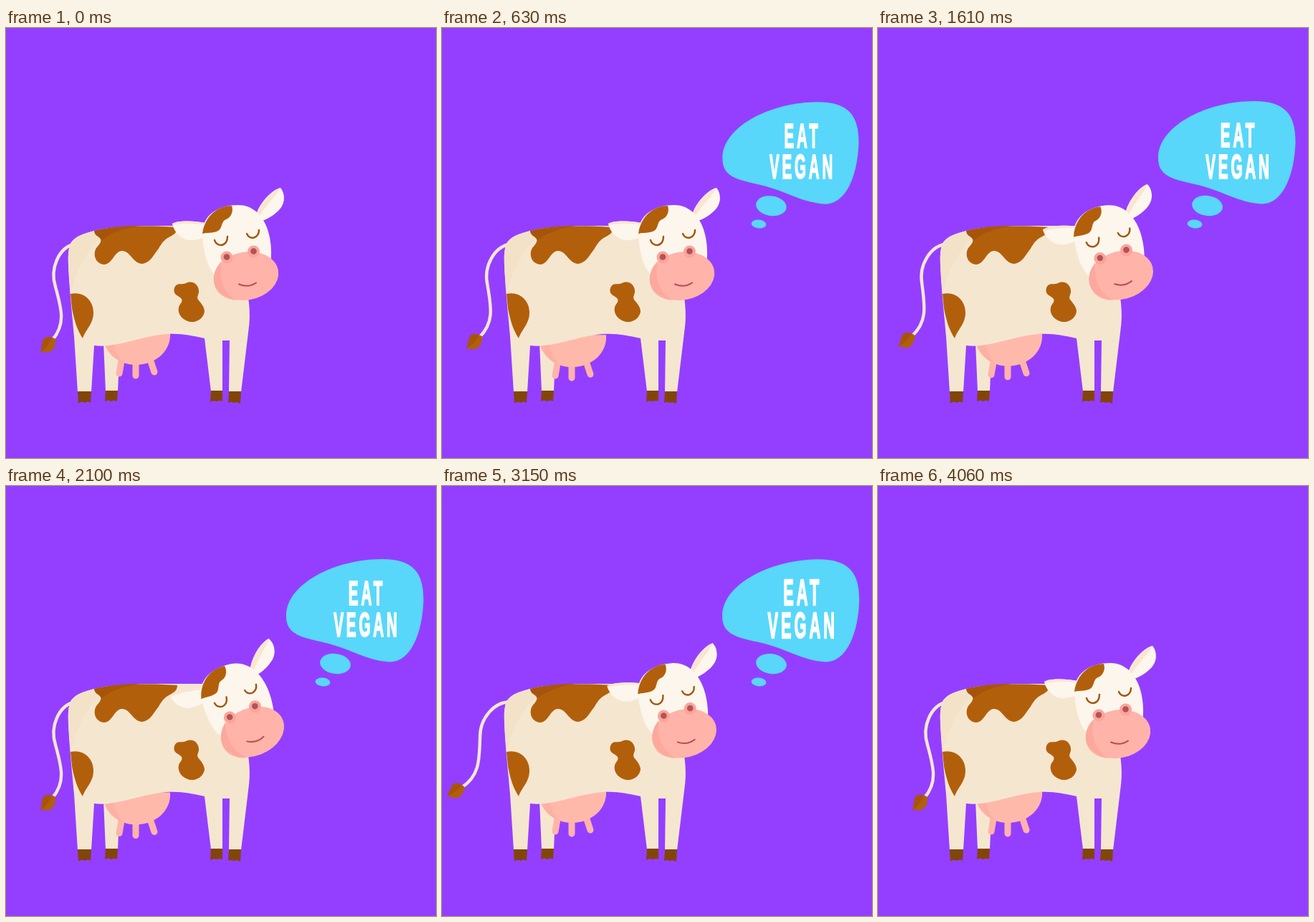
An HTML page that plays this animation: 600x600 px, repeating every 4.13 s.

```html
<!DOCTYPE html>
<html lang="en">
<head>
<meta charset="utf-8">
<title>Cow with a thought bubble</title>
<style>
  html, body { margin: 0; width: 100%; height: 100%; overflow: hidden; background: #943fff; }
  svg { display: block; width: 100%; height: 100%; }
  .skin { fill: #f5e6cf; }
  .rump { fill: #f3e1c8; }
  .pale { fill: #fcf6ec; }
  .shade { fill: #f8e5d2; }
  .brown { fill: #b25f0c; }
  .dark { fill: #a7540b; }
  .hoof { fill: #824509; }
  .pink { fill: #ffb3a9; }
  .udder { fill: #ffb9ab; }
  .rose { fill: #fda49a; }
  .dot { fill: #b0545a; }
  .cyan { fill: #58d7fb; }
  .line { fill: none; stroke-width: 2.4; stroke-linecap: round; }
  text {
    font: bold 48px "Liberation Sans", Arial, sans-serif;
    letter-spacing: 9px;
    text-anchor: middle;
    fill: #fff;
    stroke: #fff;
    stroke-width: 2.2;
    stroke-linejoin: round;
  }
</style>
</head>
<body>
<svg viewBox="0 0 600 600">
  <rect width="600" height="600" fill="#943fff"/>

  <g id="tail">
    <path class="line" stroke="#f5e6cf" style="stroke-width:4.4"
      d="M97 301C73 306 61 336 69 361C77 391 84 412 65 435"/>
    <path class="brown" d="M53 433C58 430 66 431 69 434C70 443 66 449 63 451C58 454 52 451 48 453C51 446 49 438 53 433Z"/>
    <path class="dark" d="M53 433C57 430 61 431 64 432C60 441 55 448 48 453C51 446 49 438 53 433Z"/>
  </g>

  <path class="skin" d="M136 438L139 507H156L159 438Z"/>
  <path class="hoof" d="M139 506H156L155 521Q151 518 147 521Q142 518 138 521Z"/>

  <g id="udder">
    <path class="line" stroke="#ffb3a9" style="stroke-width:9" d="M161 465L158 482M181 467V485M201 462L207 480"/>
    <path class="udder" d="M135 425H229C231 450 209 470 181 470C157 470 135 452 135 425Z"/>
    <path class="rose" opacity=".45" d="M135 425H150C149 444 154 457 164 467C147 461 135 447 135 425Z"/>
  </g>

  <path class="skin" d="M91 299C98 290 108 287 123 283C150 275 210 276 275 276L330 300L338 376C341 398 340 410 338 425L328 508H311L312 436H302V507H286L277 433C255 428 237 425 215 428C180 433 150 447 123 443L119 508H100L95 430C92 395 86 342 87 315Q88 304 91 299Z"/>
  <path class="rump" d="M91 299C98 290 108 287 123 283L133 293C112 309 98 338 90 371C88 345 86 325 87 315Q88 304 91 299Z"/>
  <g class="hoof">
    <path d="M100 507H119L118 523Q114 520 110 523Q105 520 101 524Z"/>
    <path d="M286 506H302V521Q298 519 294 521Q289 519 285 522Z"/>
    <path d="M311 507H328L327 524Q322 521 318 523Q314 521 310 523Z"/>
  </g>

  <g class="brown">
    <path d="M123 283C150 276 205 275 239 278C239 284 236 287 231 290C217 296 216 305 209 313C202 324 196 329 189 329C176 327 173 310 161 311C150 313 149 329 137 330C124 329 121 315 126 307C132 300 134 297 131 293C128 290 124 290 123 283Z"/>
    <path d="M90 371C108 367 122 380 122 397C122 413 111 421 107 433C100 423 95 408 92 391Z"/>
    <path d="M235 363C238 354 246 359 251 356C262 351 270 360 269 369C268 374 266 375 268 379C272 384 277 389 277 396C275 406 266 411 257 410C246 408 239 399 241 390C242 385 247 383 245 378C242 373 232 373 235 363Z"/>
  </g>
  <path class="dark" d="M123 283C145 277 170 276 187 276C165 279 147 286 133 296C131 290 124 290 123 283Z"/>

  <g id="head">
    <path class="pale" d="M278 272C262 269 240 268 232 273C234 284 245 298 262 296C270 295 276 293 280 290Z"/>
    <path class="shade" d="M278 272C262 269 240 268 232 273L233 275C246 272 262 273 278 274Z"/>
    <path class="pale" d="M348 265C350 250 368 227 383 223C390 231 390 246 380 255C372 263 362 268 354 270Z"/>
    <path class="shade" d="M348 265C350 250 368 227 383 223C379 233 360 249 351 267Z"/>
    <path class="pale" d="M274 290C272 263 294 247 324 247C352 247 371 275 370 318L368 345L300 352C280 340 276 312 274 290Z"/>
    <path class="brown" d="M274 287C277 263 295 248 315 248C318 257 313 265 307 267C300 269 302 280 296 283C288 287 280 285 274 287Z"/>
    <g class="line" stroke="#a0550c">
      <path d="M291 296Q293 303 301 303Q309 301 309 291"/>
      <path d="M336 287Q339 294 346 292.500Q353 290 353 282"/>
    </g>
    <ellipse class="pink" cx="335" cy="346" rx="45.500" ry="33.500" transform="rotate(-10 335 346)"/>
    <path class="rose" opacity=".75" d="M301 325C286 340 286 362 301 373Q309 379 322 380C302 370 296 346 301 325Z"/>
    <circle class="rose" cx="308" cy="320" r="8.500"/>
    <circle class="rose" cx="345.500" cy="312" r="8.500"/>
    <circle class="dot" cx="308" cy="319.500" r="4.300"/>
    <circle class="dot" cx="345.500" cy="311.500" r="4.300"/>
    <path class="line" stroke="#b9484f" style="stroke-width:2" d="M325 357.500Q338 363 349 355.500"/>
  </g>

  <g id="bubble">
    <path class="cyan" d="M391 180C392 136 460 102 525 102C570 102 583 123 582.500 160C581 205 565 246 535 245.500C500 243 480 226 440 217.500C410 211 390 206 391 180Z"/>
    <ellipse class="cyan" cx="459.500" cy="248" rx="21.500" ry="14" transform="rotate(8 459.5 248)"/>
    <ellipse class="cyan" cx="442" cy="273.500" rx="10.500" ry="6" transform="rotate(5 442 273.5)"/>
    <g id="words">
      <g transform="translate(503.500 0) scale(.43 1)">
        <text y="166">EAT</text>
        <text y="210">VEGAN</text>
      </g>
    </g>
  </g>

  <path id="petal" fill="#d9b8f7" d="M-4 4C-5 -2 1 -6 5 -2L2 -1L1 2L-1 0Z"/>
</svg>

<script>
const LOOP = 4130, STEP = 70;
const part = id => document.getElementById(id);
const progress = (t, from, to) => Math.min(1, Math.max(0, (t - from) / (to - from)));
const ease = x => (1 - Math.cos(Math.PI * x)) / 2;
const pulse = x => Math.sin(Math.PI * x) ** 2;

// A damped spring from 0 to 1, played backwards before the end.
const spring = u => u <= 0 ? 0 : 1 - Math.exp(-.0072 * u) * Math.cos(.0092 * u);
const popInOut = (t, start, end) => spring(Math.min(t - start, end - t));

const move = (id, value) => part(id).setAttribute("transform", value);
const turn = (id, angle, x, y) => move(id, `rotate(${angle} ${x} ${y})`);
const grow = (id, size, x, y) =>
  move(id, `translate(${x} ${y}) scale(${size}) translate(${-x} ${-y})`);

function draw(t) {
  const swing = pulse(progress(t, 300, 2010)) + pulse(progress(t, 2090, 4050));
  turn("tail", 17.1 * swing, 95, 302);

  const tilt = ease(progress(t, 1050, 2270)) - ease(progress(t, 2700, 3430));
  turn("head", -12 * tilt, 325, 300);

  const bounces = 3 * progress(t, 140, 2660);
  move("udder", `translate(0 ${3.4 * pulse(bounces)})`);

  grow("bubble", popInOut(t, 70, 3935), 442, 275);
  grow("words", popInOut(t, 110, 3540), 505, 167);

  const drift = progress(t, 910, 1260);
  move("petal", `translate(${548 + 42 * drift} ${257 + 4 * drift})`);
  part("petal").setAttribute("opacity", drift > 0 ? 1 - drift : 0);
}

const start = performance.now();
function tick() {
  const t = (performance.now() - start) % LOOP;
  draw(Math.floor(t / STEP) * STEP);
  requestAnimationFrame(tick);
}
tick();
</script>
</body>
</html>
```
